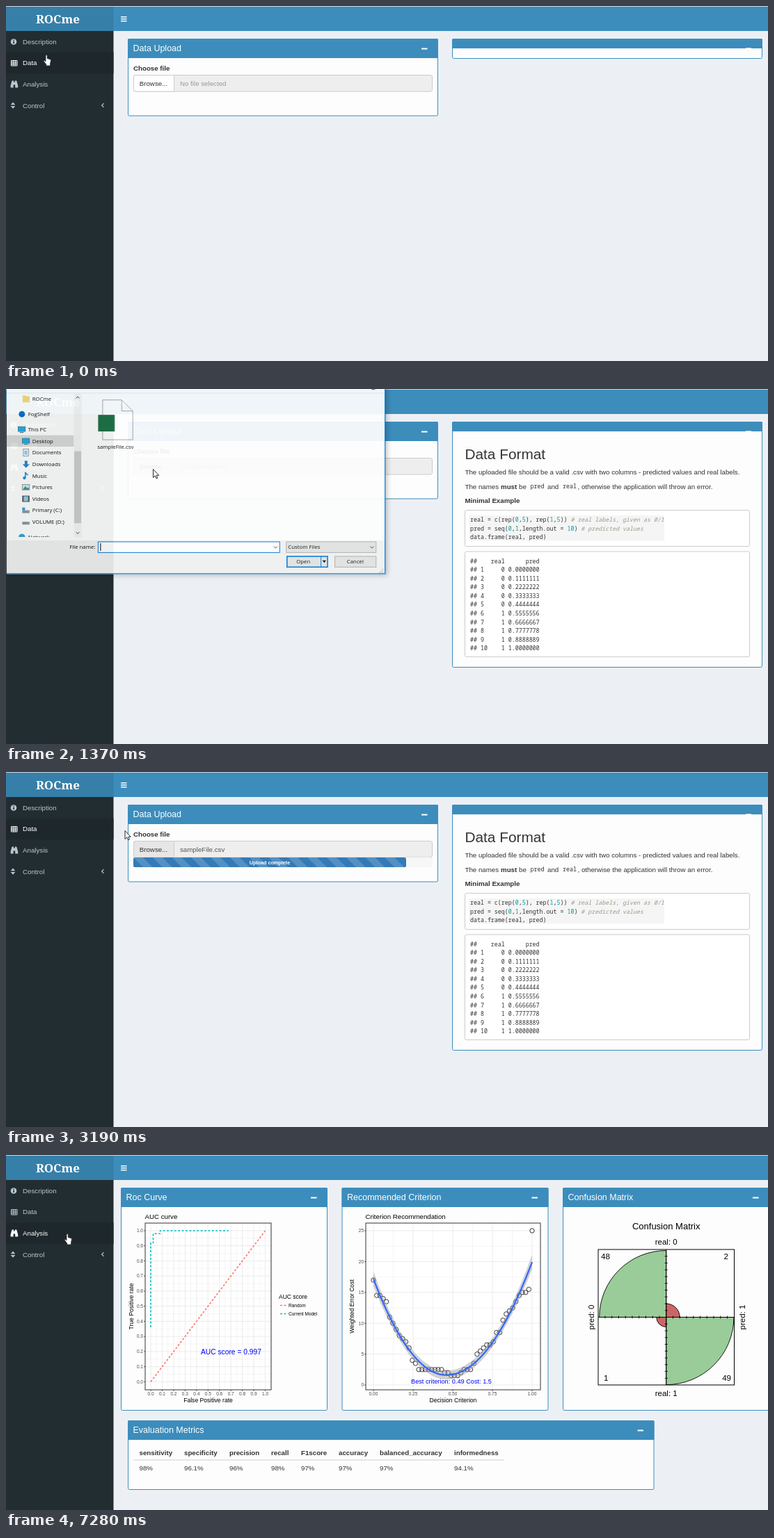
These frames come from a looping animation (1095 by 511 pixels, 8000 ms). An HTML page:

```html
<!DOCTYPE html>
<html lang="en">
<head>
<meta charset="utf-8">
<title>ROCme</title>
<style>
html, body { margin: 0; width: 100%; height: 100%; overflow: hidden; background: #ecf0f5; }
svg { display: block; }
text { font-family: "Liberation Sans", Arial, sans-serif; white-space: pre; }
text.mono, tspan.mono { font-family: "Noto Sans Mono", "DejaVu Sans Mono", monospace; }
text.ui { font-family: "Open Sans", "Noto Sans", sans-serif; }
text.logo { font-family: "Noto Serif", serif; }
.item { color: #b8c7ce; }
.item.on { color: #fff; }
.item .row { fill: none; }
.item.on .row { fill: #1e282c; }
.num { fill: #099; }
.note { fill: #998; font-style: italic; }
</style>
</head>
<body>
<svg id="stage" width="1095" height="511" viewBox="0 0 1095 511"></svg>
<script>
const BLUE = '#3c8dbc', INK = '#333', BODY = 9.73, MONO = 8.3, UI = 7.85;

// Shape helpers; text is placed by the middle of its capitals.
const range = (n, f) => Array.from({ length: n }, (_, i) => f(i)).join('');
const rect = (x, y, w, h, fill, more = '') =>
  `<rect x="${x}" y="${y}" width="${w}" height="${h}" fill="${fill}" ${more}/>`;
const path = (d, stroke, width = 1, more = 'fill="none"') =>
  `<path d="${d}" stroke="${stroke}" stroke-width="${width}" ${more}/>`;
const shape = (d, fill, more = '') => `<path d="${d}" fill="${fill}" ${more}/>`;
const disc = (x, y, r, fill, more = '') => `<circle cx="${x}" cy="${y}" r="${r}" fill="${fill}" ${more}/>`;
const text = (x, cy, s, { size = BODY, fill = INK, anchor = 'start', bold, cls = '', turn } = {}) =>
  `<text x="${x}" y="${cy + size * 0.36}" font-size="${size}" fill="${fill}" text-anchor="${anchor}"` +
  ` class="${cls}"${bold ? ' font-weight="700"' : ''}${turn ? ` transform="rotate(-90 ${x} ${cy})"` : ''}>${s}</text>`;
const mono = (x, cy, s) => text(x, cy, s, { size: MONO, cls: 'mono' });
const ui = (x, cy, s, anchor) => text(x, cy, s, { size: UI, fill: '#111', cls: 'ui', anchor });
const group = (id, content, more = '') => `<g id="${id}" ${more}>${content}</g>`;

function card(x, y, w, h, title, head = 28) {
  return rect(x + .5, y + .5, w - 1, h - 1, '#fdfdfd', `rx="2" stroke="${BLUE}" class="frame"`) +
    rect(x, y, w, head, BLUE, 'rx="1.5"') +
    (title ? text(x + 7.5, y + 13.5, title, { size: 12.5, fill: '#fff' }) +
      rect(x + w - 24, y + 13.5, 8.5, 2, '#fff') : '');
}

function sidebar() {
  const icons = {
    Description: disc(11, 51.5, 4.3, 'currentColor') + rect(10.3, 50.7, 1.6, 3.3, '#222d32') + rect(10.3, 48.5, 1.4, 1.4, '#222d32'),
    Data: path('M7.5 78.5h8.5v7.5h-8.5zM7.5 81h8.5M7.5 83.5h8.5M10.3 78.5v7.5M13.2 78.5v7.5', 'currentColor'),
    Analysis: shape('M8.6 107.5h2.4v2h1.8v-2h2.4l2 7v3h-4v-4h-2.6v4h-4v-3z', 'currentColor'),
    Control: shape('M6.7 142.2l3.3-3.7 3.3 3.7zM6.7 144l3.3 3.7 3.3-3.7z', 'currentColor') + path('M140.5 140.2l-2.8 2.8 2.8 2.8', 'currentColor', 1.2)
  };
  return rect(0, 36, 154.5, 475, '#222d32') + Object.keys(icons).map((name, i) => {
    const y = 36 + i * 30.6;
    return group('item' + name, rect(0, y, 154.5, 30.6, 'none', 'class="row"').replace('fill="none"', '') +
      icons[name] + text(24, y + 15.3, name, { fill: 'currentColor' }), 'class="item"');
  }).join('');
}

function header() {
  return rect(0, 0, 1095, 1, '#d2d6de') + rect(0, 1, 1095, 35, BLUE) + rect(0, 1, 154.5, 35, '#367fa9') +
    text(74.5, 18.7, 'ROCme', { size: 17, fill: '#fff', bold: true, anchor: 'middle', cls: 'logo' }) +
    range(3, i => rect(165, 15 + i * 3, 8.5, 1.5, '#fff'));
}

function dataPage() {
  const cell = 27.8, half = cell / 2;
  const upload = card(175, 47, 446, 111.5, 'Data Upload') +
    text(183, 89, 'Choose file', { bold: true }) +
    rect(183.5, 99.5, 429, 23.5, '#eee', 'rx="2.5" stroke="#ccc"') +
    shape('M241.5 99.5V123H186q-2.5 0-2.5-2.5V102q0-2.5 2.5-2.5z', '#fff', 'id="browse" stroke="#ccc"') +
    text(212, 111.3, 'Browse...', { anchor: 'middle' }) +
    group('noFile', text(250, 111.3, 'No file selected', { fill: '#999' })) +
    group('file', text(250, 111.3, 'sampleFile.csv', { fill: '#555' }) +
      rect(183, 123, 430, 14, '#f7f7f7', 'rx="2.5"') +
      rect(183, 123, 0, 14, '#337ab7', 'rx="2" class="bar"') + rect(183, 123, 0, 14, 'url(#stripes)', 'rx="2" class="bar"') +
      group('done', text(0, 130, 'Upload complete', { size: 7.25, fill: '#fff', bold: true, anchor: 'middle' })));
  const stripes = `<pattern id="stripes" x="183" y="123" width="${cell}" height="${cell}" patternUnits="userSpaceOnUse">` +
    shape(`M0 ${cell}H${half}L0 ${half}zM0 0H${half}L${cell} ${half}V${cell}z`, '#fff', 'fill-opacity=".17"') + '</pattern>';
  return `<defs>${stripes}</defs>` + upload +
    group('short', card(641, 47, 446, 29, '', 14)) + group('guide', guide()) +
    rect(1063, 60, 8, 1.4, '#fff', 'opacity=".7"');
}

function guide() {
  const nums = s => s.replace(/\d+/g, '<tspan class="num">$&</tspan>');
  const code = [['real = c(rep(0,5), rep(1,5))', ' # real labels, given as 0/1'],
    ['pred = seq(0,1,length.out = 10)', ' # predicted values'], ['data.frame(real, pred)', '']];
  const row = i => i === 0 ? '##    real      pred'
    : '## ' + String(i).padEnd(2) + (i > 5 ? '    1 ' : '    0 ') + ((i - 1) / 9).toFixed(7);
  return card(641, 47, 446, 354, '', 14) +
    text(659.5, 94, 'Data Format', { size: 20.8 }) +
    text(659.5, 119, 'The uploaded file should be a valid .csv with two columns - predicted values and real labels.') +
    text(659.5, 140, 'The names') + text(711, 140, 'must', { bold: true }) + text(737, 140, 'be') +
    mono(753.5, 140.5, 'pred') + text(778, 140, 'and') + mono(800, 140.5, 'real') +
    text(821.5, 140, ', otherwise the application will throw an error.') +
    text(659.5, 160.7, 'Minimal Example', { bold: true }) +
    rect(659.5, 174.5, 409, 52, '#fff', 'rx="2" stroke="#ccc"') + rect(665, 182, 281, 36.5, '#f5f5f5') +
    code.map(([a, b], i) => mono(667, 188.5 + i * 12.5, nums(a) + `<tspan class="note">${b}</tspan>`)).join('') +
    rect(659.5, 234, 409, 151.5, '#fff', 'rx="2" stroke="#ccc"') +
    range(11, i => mono(667, 247.7 + i * 12.55, row(i)));
}

// Panel with grid lines, tick labels and axis titles.
function panel({ left, right, xs, ys, title, xName, yName, xMinor, yMinor }) {
  const top = 98, bottom = 338, small = { size: 6.5, fill: '#4d4d4d' };
  const v = (x, w) => path(`M${x} ${top}V${bottom}`, '#ebebeb', w);
  const h = (y, w) => path(`M${left} ${y}H${right}`, '#ebebeb', w);
  return rect(left, top, right - left, bottom - top, '#fff') +
    xs.map(([x]) => v(x, 1) + (x + xMinor < right ? v(x + xMinor, .5) : '')).join('') +
    ys.map(([y]) => h(y, 1) + (y - yMinor > top ? h(y - yMinor, .5) : '')).join('') +
    rect(left, top, right - left, bottom - top, 'none', 'stroke="#333"') +
    xs.map(([x, s]) => path(`M${x} ${bottom}v2`, INK, .8) + text(x, 343.5, s, { ...small, anchor: 'middle' })).join('') +
    ys.map(([y, s]) => path(`M${left} ${y}h-2`, INK, .8) + text(left - 3, y, s, { ...small, anchor: 'end' })).join('') +
    text(left - .5, 89, title, { size: 9.7, fill: '#000' }) +
    text((left + right) / 2, 353, xName, { size: 8.6, fill: '#000', anchor: 'middle' }) +
    text(left - 20, 218, yName, { size: 8.6, fill: '#000', anchor: 'middle', turn: true });
}

function rocPlot() {
  const ticks = f => Array.from({ length: 11 }, (_, i) => [f(i), (i / 10).toFixed(1)]);
  const dash = (d, c) => path(d, c, 1.6, 'fill="none" stroke-dasharray="3 2.4"');
  return panel({ left: 200, right: 381, xs: ticks(i => 208 + i * 16.45), ys: ticks(i => 326.4 - i * 21.75),
    xMinor: 8.2, yMinor: 10.9, title: 'AUC curve', xName: 'False Positive rate', yName: 'True Positive rate' }) +
    dash('M208 326.4L372.5 109', '#f8766d') +
    dash('M208 248V126.5H211.5V113.3H221.5V109H320', '#00bfc4') +
    text(280, 283, 'AUC score = 0.997', { size: 10.25, fill: '#00f' }) +
    text(392, 204, 'AUC score', { size: 8.5, fill: '#000' }) +
    ['Random', 'Current Model'].map((s, i) => dash(`M394 ${216.5 + i * 12}h10`, ['#f8766d', '#00bfc4'][i]) +
      text(406, 216.5 + i * 12, s, { size: 6.5, fill: '#000' })).join('');
}

function costPlot() {
  const X = v => 528 + v * 228, Y = v => 331 - v * 8.88;
  const costs = [17, 14.5, 14.5, 14, 13.5, 11, 10, 9, 8, 7.5, 7, 6, 4, 3.5, ...Array(8).fill(2.5), 2, 2, 1.5, 1.5, 1.5,
    2, 2.5, 2.5, 2.5, 3.5, 5, 5.5, 6, 6.5, 6.5, 7, 8.5, 8.5, 10.5, 11.5, 12, 12.5, 13.5, 14.5, 15, 15, 15.5, 25];
  const fit = v => 1.6 + (v < .46 ? 73.7 : 62.8) * (v - .46) ** 2;
  const spread = v => .6 + 8 * Math.abs(v - .5) ** 4 + .1;
  const line = (sign, back) => Array.from({ length: 61 }, (_, i) => {
    const v = (back ? 60 - i : i) / 60;
    return `${X(v).toFixed(1)} ${Y(fit(v) + sign * spread(v)).toFixed(1)}`;
  }).join('L');
  return panel({ left: 517, right: 768, xs: [0, .25, .5, .75, 1].map(v => [X(v), v.toFixed(2)]),
    ys: [0, 5, 10, 15, 20, 25].map(v => [Y(v), v]), xMinor: 28.5, yMinor: 22.2,
    title: 'Criterion Recommendation', xName: 'Decision Criterion', yName: 'Weighted Error Cost' }) +
    costs.map((c, i) => disc(X(i / 49).toFixed(1), Y(c), 3.2, 'none', 'stroke="#222" stroke-width=".9"')).join('') +
    shape(`M${line(1)}L${line(-1, true)}z`, '#999', 'opacity=".45"') +
    path('M' + line(0), '#36f', 2.2) +
    text(640, 326, 'Best criterion: 0.49 Cost: 1.5', { size: 9.2, fill: '#00f', anchor: 'middle' });
}

function foldPlot() {
  const cx = 948.7, cy = 233.5, size = 11.5, fill = '#000';
  const label = (x, y, s, more) => text(x, y, s, { size, fill, anchor: 'middle', ...more });
  const wedge = (r, sx, sy, color) => shape(`M${cx} ${cy}h${sx * r}A${r} ${r} 0 0 ${sx * sy > 0 ? 1 : 0} ${cx} ${cy + sy * r}z`, color, 'stroke="#000" stroke-width=".9"');
  return label(cx, 102, 'Confusion Matrix', { size: 13 }) + label(cx, 125, 'real: 0') + label(cx, 343, 'real: 1') +
    label(841, cy, 'pred: 0', { turn: true }) + label(1058, cy, 'pred: 1', { turn: true }) +
    wedge(96, -1, -1, '#9c9') + wedge(97.2, 1, 1, '#9c9') + wedge(19.5, 1, -1, '#c66') + wedge(14, -1, 1, '#c66') +
    rect(851, 136, 195.5, 195, 'none', 'stroke="#000"') +
    path(`M851 ${cy}h195.5M${cx} 136v195` + range(19, i => {
      const d = (i - 9) * 9.75;
      return `M${cx + d} ${cy - 2}v4M${cx - 2} ${cy + d}h4`;
    }), '#000', .9) +
    label(855, 146, '48', { anchor: 'start' }) + label(1038, 146, '2', { anchor: 'end' }) +
    label(859, 321, '1', { anchor: 'start' }) + label(1042, 321, '49', { anchor: 'end' });
}

function analysisPage() {
  const table = [[191.5, 'sensitivity', '98%'], [256, 'specificity', '96.1%'], [321, 'precision', '96%'], [381, 'recall', '98%'],
    [424, 'F1score', '97%'], [478, 'accuracy', '97%'], [537, 'balanced_accuracy', '97%'], [644, 'informedness', '94.1%']];
  return card(165, 47, 297, 321, 'Roc Curve') + card(482.5, 47, 297, 321, 'Recommended Criterion') +
    card(800, 47, 297, 321, 'Confusion Matrix') +
    group('metrics', card(175, 382, 756.5, 43, 'Evaluation Metrics')) +
    group('results', rocPlot() + costPlot() + foldPlot() + rect(183, 438.3, 533, 1.4, '#ddd') +
      table.map(([x, name, v]) => text(x, 428, name, { bold: true }) + text(x, 450, v)).join(''));
}

function dialog() {
  const arrow = (x, y, s = 1) => path(`M${x - 2.5} ${y - s * 1.2}l2.5 ${s * 2.6} 2.5 ${-s * 2.6}`, '#444');
  const page = y => rect(24, y - 5, 7.5, 10, '#fff', 'stroke="#789" stroke-width=".8"') + path(`M25.5 ${y - 2}h4.5M25.5 ${y}h4.5M25.5 ${y + 2}h4.5`, '#2a8dd4', .9);
  const screen = y => rect(22.5, y - 4, 10.5, 7, '#29a8e8', 'stroke="#176" stroke-width=".6"') + rect(25, y + 4, 5.5, 1, '#567');
  const drive = y => rect(22.5, y, 10.5, 4, '#8a959c') + rect(29.5, y + 1.5, 2, 1, '#4e4');
  const places = [
    ['ROCme', 37, 14, y => shape(`M23 ${y - 5}h4l1 1h5v9h-10z`, '#f7d774')],
    ['FogShelf', 31, 36, y => disc(22, y, 4.5, '#0a6cc8')],
    ['This PC', 31, 58, y => `<g transform="translate(-6 0)">${screen(y)}</g>`],
    ['Desktop', 37, 75, screen], ['Documents', 37, 91.6, page],
    ['Downloads', 37, 108.3, y => shape(`M26 ${y - 5}h4v5h3l-5 5.5-5-5.5h3z`, '#2b86d6')],
    ['Music', 37, 125, y => path(`M27 ${y + 3}v-8q1 3 4 4`, '#1e90dc', 1.6) + disc(25.6, y + 3.2, 2.2, '#1e90dc')],
    ['Pictures', 37, 141.6, y => rect(22.5, y - 4, 10.5, 8, '#cfe8f7', 'stroke="#888" stroke-width=".8"') + shape(`M23 ${y + 3.5}l4-5 3 3 1.5-1 1.5 3z`, '#3a8f86')],
    ['Videos', 37, 158.3, y => rect(22.5, y - 4.5, 10.5, 9, '#456') + rect(24.5, y - 3.5, 6.5, 7, '#9cc8d8')],
    ['Primary (C:)', 37, 175, y => rect(22.5, y - 4, 4, 4, '#18a4e0') + drive(y)], ['VOLUME (D:)', 37, 191.6, drive],
    ['Network', 31, 213.7, y => disc(22, y, 4.8, '#3aa0d8')]
  ];
  const button = (x, y, w, more) => rect(x + .5, y + .5, w, 15.5, '#e1e1e1', `stroke="#adadad" ${more || ''}`);
  return '<defs><clipPath id="list"><path d="M0 0H546V213.5H0z"/></clipPath></defs>' +
    rect(0, -20, 546, 287, '#fdfdfd', 'style="filter:drop-shadow(3px 2px 4px rgba(0,0,0,.25))"') +
    path('M0 5.5H546', '#e8e8e8') + rect(0, 66.5, 97, 16.5, '#d9d9d9') +
    rect(97, 6, 11, 208, '#f3f3f3') + rect(97.5, 89.5, 10, 104, '#cdcdcd') + arrow(102.5, 12, -1) + arrow(102.5, 207.5) +
    `<g clip-path="url(#list)">${places.map(([s, x, y, icon]) => icon(y) + ui(x, y, s)).join('')}</g>` +
    rect(121.5, 10.5, 68.5, 84, 'none', 'id="pick"') +
    path('M138.5 15.5H166L182 31.5V73H138.5zM166 15.5V31.5H182', '#a6a6a6', 1, 'fill="#fff"') +
    rect(132, 37, 24, 24, '#1e7145') + ui(157, 83.5, 'sampleFile.csv', 'middle') +
    rect(0, 218.5, 546, 48.5, '#f0f0f0') + ui(128, 228, 'File name:', 'end') +
    rect(132, 220.5, 262, 15.5, '#fff', 'stroke="#0078d7" class="focus"') + arrow(388, 228.3) +
    path('M135.5 222.5v11', '#000', 1, 'id="caret"') + group('typed', ui(134.5, 228, 'sampleFile.csv')) +
    button(403, 220, 129.5) + ui(406, 228, 'Custom Files') + arrow(527, 228.3) +
    button(404, 241, 58.5, 'style="stroke-width:1.6" class="focus"') + path('M453.5 241v16', '#0078d7', 1, 'class="focus"') +
    ui(428, 249, 'Open', 'middle') + shape('M455.5 247.5h5.5l-2.75 3.2z', '#000') +
    button(473, 241, 59.5) + ui(503, 249, 'Cancel', 'middle') +
    disc(529, -3, 4, '#1c74c4') + range(3, i => range(i + 1, j => rect(542 - j * 2.4, 259.5 + i * 2.4, 1.2, 1.2, '#aaa'))) +
    path('M546 0V266.7H0', '#0078d7', 1.3, 'fill="none" class="focus"');
}

const stage = document.getElementById('stage');
stage.innerHTML = rect(0, 0, 1095, 511, '#ecf0f5') + sidebar() + header() +
  group('dataPage', dataPage()) + group('analysisPage', analysisPage()) + group('dialog', dialog()) +
  group('cursor',
    shape('M0 0V12L2.8 9.4 4.6 13.4 6.4 12.6 4.7 8.8H8.2z', '#fff', 'id="arrow" stroke="#111" stroke-width=".9"') +
    shape('M3 1.2Q4.2-.2 5.2 1.2V5.5L9.4 6.8Q10.8 7.4 10.4 9L9.4 13.5V16H3.8V14.2L.3 9.6Q.2 8 1.6 8.6L3 10z', '#fff', 'id="hand" stroke="#222" stroke-width=".7"'));

const $ = id => document.getElementById(id);
const show = (id, on) => $(id).setAttribute('display', on ? 'inline' : 'none');
const all = (sel, name, value) => stage.querySelectorAll(sel).forEach(n => n.setAttribute(name, value));

// Stepped tracks: [start in ms, ...values]
const pointer = [[0, 54, 70], [120, 192, 125], [270, 201, 126], [840, 210, 118], [970, 211.5, 115.5], [1770, 206, 111],
  [1890, 199, 108], [2030, 193, 105], [2160, 190, 104], [2310, 186, 88], [2460, 185, 87], [3190, 171, 84.5],
  [3320, 163, 100], [3440, 155, 118], [3890, 130, 116], [4010, 108, 114], [4130, 92, 113], [4260, 84, 113]];
const opening = [[0, 0, 1], [1250, .72, .986], [1370, .93, .996], [1490, 1, 1], [2890, 0, 1]];
const upload = [[0, 0], [2890, 70], [3040, 287], [3190, 392], [3320, 424], [3440, 430]];
const caret = [[0, 1], [1770, 0], [2310, 1], [2460, 0]];
const at = (track, t) => track.findLast(step => step[0] <= t).slice(1);

function draw(t) {
  const within = (a, b) => t >= a && t < b;
  const analysis = t >= 5720, results = t >= 7280, closing = t >= 2740;
  $('itemData').classList.toggle('on', !analysis);
  $('itemAnalysis').classList.toggle('on', t >= 3890);
  show('dataPage', !analysis);
  show('analysisPage', analysis);
  show('results', results);
  $('metrics').querySelector('.frame').setAttribute('height', results ? 99 : 42);
  show('short', t < 580);
  show('guide', t >= 580);
  show('noFile', t < 2890);
  show('file', t >= 2890);
  $('browse').setAttribute('fill', within(840, 3320) ? '#e6e6e6' : '#fff');

  const [width] = at(upload, t);
  all('.bar', 'width', width);
  $('done').setAttribute('transform', `translate(${183 + width / 2} 0)`);

  const [alpha, scale] = at(opening, t);
  show('dialog', alpha > 0);
  $('dialog').setAttribute('opacity', alpha);
  $('dialog').setAttribute('transform', `translate(233 85) scale(${scale}) translate(-233 -85)`);
  all('#dialog .focus', 'stroke', closing ? '#adadad' : '#0078d7');
  show('caret', at(caret, t)[0]);
  show('typed', t >= 2590);
  $('pick').setAttribute('fill', closing ? '#d9d9d9' : t >= 2590 ? '#cce8ff' : t >= 2460 ? '#e5f3ff' : 'none');

  const [x, y] = at(pointer, t), hand = t < 120 || t >= 3890;
  $('cursor').setAttribute('transform', `translate(${x} ${y})`);
  show('hand', hand);
  show('arrow', !hand);
}

const start = performance.now();
function tick() {
  draw((performance.now() - start) % 8000);
  requestAnimationFrame(tick);
}
tick();
</script>
</body>
</html>
```
